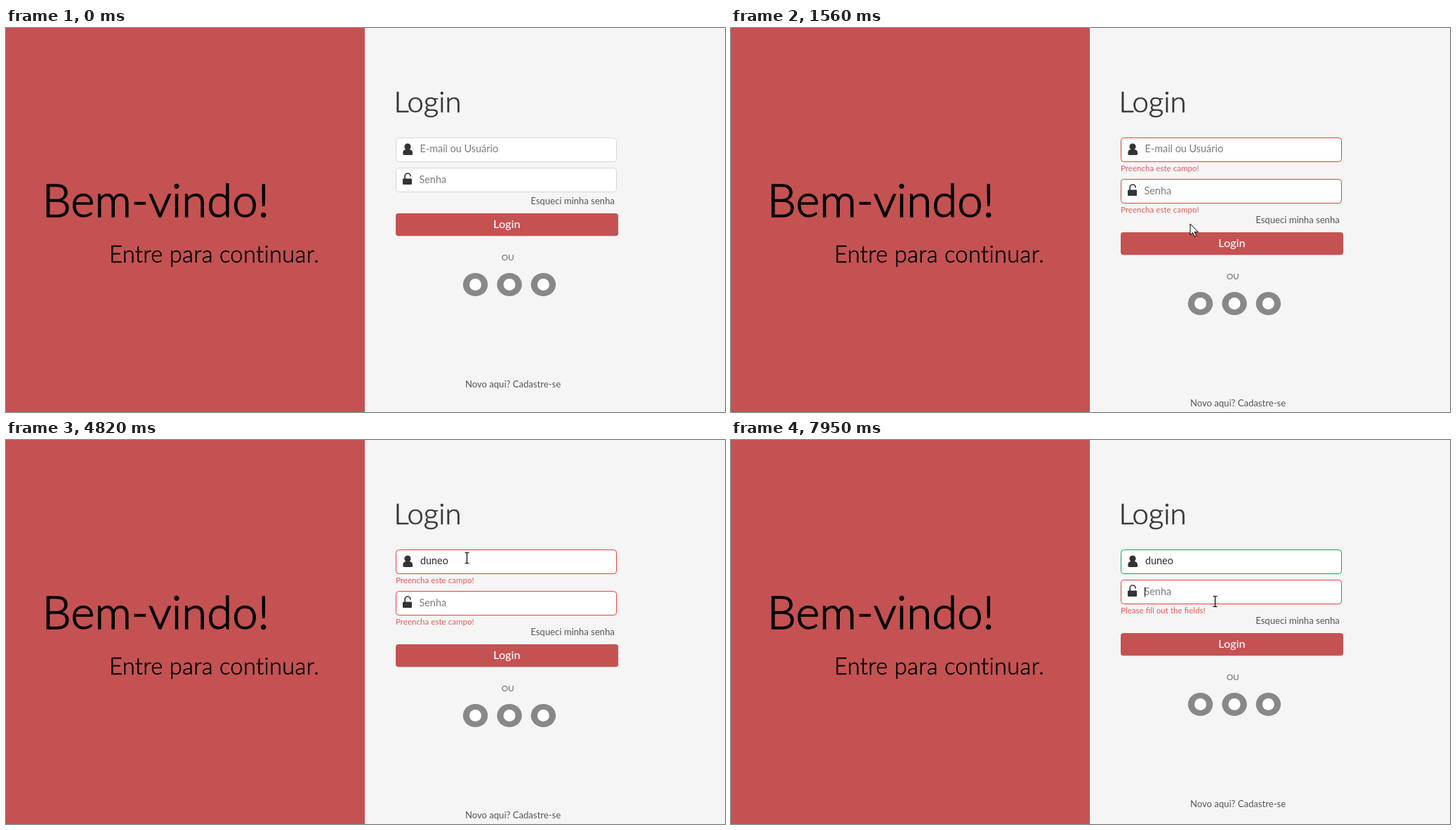
An HTML page for the animation above (8000 ms loop, 1024 by 547 pixels).

```html
<!DOCTYPE html>
<html lang="pt-BR">
<head>
<meta charset="utf-8">
<title>Login</title>
<style>
  html, body { margin: 0; width: 100%; height: 100%; overflow: hidden; background: #f5f5f5; }
  svg { display: block; width: 100vw; height: 100vh; font-family: Lato, "Open Sans", sans-serif; fill: #55575a; }
  .light { font-weight: 300; }
  .field { fill: #fff; stroke: #d6d6d6; }
  .hint { font-size: 14.4px; fill: #787f86; }
  .typed { font-size: 14.4px; fill: #2c2c2c; }
  .error { font-size: 11.6px; fill: #e35d5a; }
  .link { font-size: 13.1px; text-anchor: middle; }
  .icon { fill: #343436; }
  .cursor { fill: #fff; stroke: #000; stroke-linejoin: round; }
</style>
</head>
<body>
<svg viewBox="0 0 1024 547">
  <rect width="511" height="547" fill="#c55252"/>
  <g class="light" fill="#000" stroke="#000">
    <text x="51.5" y="269" font-size="65.3" stroke-width="1.4">Bem-vindo!</text>
    <text x="147" y="334" font-size="32.7" letter-spacing=".3" stroke-width=".5">Entre para continuar.</text>
  </g>
  <text class="light" x="552.5" y="120" font-size="41.8" fill="#363638" stroke="#363638" stroke-width=".7">Login</text>

  <rect id="userField" class="field" x="555.5" y="156.5" width="314" height="34" rx="4"/>
  <g class="icon">
    <circle cx="572" cy="169" r="4.6"/>
    <path d="M565.2 179q0-6 4.3-6h5q4.7 0 4.7 6q0 2-2 2h-10q-2 0-2-2z"/>
  </g>
  <text id="userHint" class="hint" x="589.5" y="177">E-mail ou Usuário</text>
  <text id="userText" class="typed" x="590" y="177"></text>
  <text id="userError" class="error" x="555" y="204">Preencha este campo!</text>

  <g id="password">
    <rect id="passField" class="field" x="555.5" y="199.5" width="314" height="34" rx="4"/>
    <rect class="icon" x="565" y="214.5" width="13" height="8.5" rx="1"/>
    <path d="M568.2 215v-4.2a3.9 3.8 0 0 1 7.8 0v.7" fill="none" stroke="#343436" stroke-width="1.7"/>
    <text class="hint" x="588.5" y="220.5">Senha</text>
    <text id="passError" class="error" x="555" y="247"></text>
  </g>

  <g id="tail">
    <text class="link" x="807" y="250.5">Esqueci minha senha</text>
    <rect id="button" x="555" y="264" width="317" height="32.3" rx="4"/>
    <text x="713.3" y="285" font-size="16.2" font-weight="500" text-anchor="middle" fill="#fff">Login</text>
    <text x="714.7" y="331" font-size="11.8" text-anchor="middle" fill="#686a6d">OU</text>
    <g id="social"></g>
    <text class="link" x="722" y="512">Novo aqui? Cadastre-se</text>
  </g>

  <rect id="caret" width="1" height="14" fill="#000"/>
  <circle id="click" r="11" fill="#ffe600" fill-opacity=".75"/>
  <g id="cursor" class="cursor">
    <path id="arrow" d="M0 0v16l3.7-3.5 2.4 5.6 2.5-1.1-2.4-5.3h5z"/>
    <path id="hand" d="M-1.5 1.5a1.5 1.5 0 0 1 3 0v6q2.5-1 3 1q2.4-.8 3 1q2.4-.5 2.5 1.5v4q0 3-2 5v1h-7v-1.5q-2-2-4-6q-2-2-2-3q1.2-1.7 3.5 .5zM1.5 7.5v3M4.5 8.5v3M7.5 9.5v2"/>
    <path id="beam" fill="none" stroke-width="1.2" d="M-2.5-7.5h2q1 0 1 1v13q0 1-1 1h-2M3.5-7.5h-2q-1 0-1 1M3.5 7.5h-2q-1 0-1-1"/>
  </g>
</svg>
<script>
const LOOP = 8000;
const USER = 'duneo';
const KEY_TIMES = [3620, 3820, 3890, 4090, 4290];
const CLICKS = [1500, 2760, 6340, 7890];
const CLICK_LENGTH = 60;
const RED = [229, 64, 58], GREEN = [40, 157, 75], GREY = '#d6d6d6';

// Pointer moves: first and last step time, step count, end points, optional bend
const MOVES = [
  { t0: 200, t1: 760, steps: 9, from: [894, 504], to: [657, 277] },
  { t0: 830, t1: 890, steps: 2, from: [657, 277], to: [655, 280] },
  { t0: 1020, t1: 1020, steps: 1, from: [655, 280], to: [654, 279] },
  { t0: 2030, t1: 2430, steps: 7, from: [654, 279], to: [653, 168.5], bend: [640, 222] },
  { t0: 3080, t1: 3230, steps: 3, from: [653, 168.5], to: [656, 168] },
  { t0: 5740, t1: 6010, steps: 5, from: [656, 168], to: [706, 298] },
  { t0: 7210, t1: 7280, steps: 2, from: [706, 298], to: [715, 289] },
  { t0: 7350, t1: 7620, steps: 5, from: [715, 289], to: [689, 230] }
];
const CARETS = [[2760, 3080], [3620, 4820], [5350, 5880], [7890, 8000]];

// Vertical offsets of the password field and everything below it
const LAYOUTS = [
  { start: 0, pass: 0, tail: 0 },
  { start: 1560, pass: 16, tail: 27, userError: true, passError: 'Preencha este campo!' },
  { start: 6400, pass: 0, tail: 11, passError: 'Please fill out the fields!' }
];

const $ = id => document.getElementById(id);
const show = (id, on) => $(id).setAttribute('visibility', on ? 'visible' : 'hidden');
const place = (id, x, y) => $(id).setAttribute('transform', `translate(${x} ${y})`);
const clamp = v => Math.max(0, Math.min(1, v));
const mix = (a, b, p) => a + (b - a) * p;
const latest = (list, key, t) => list.filter(item => item[key] <= t).pop();
const within = (v, low, high) => v >= low && v < high;

$('social').innerHTML = [668.5, 717, 765.3].map(x =>
  `<ellipse cx="${x}" cy="365.5" rx="17.7" ry="16.6" fill="#888"/><circle cx="${x}" cy="365.5" r="8.5" fill="#fff"/>`
).join('');

function pointerAt(t) {
  const move = latest(MOVES, 't0', t);
  if (!move) return null;
  const { t0, t1, steps, from, to } = move;
  const step = steps > 1 ? Math.floor((t - t0) / (t1 - t0) * (steps - 1)) : 0;
  const linear = clamp((step + 1) / steps);
  const p = linear * linear * (3 - 2 * linear);
  const bend = move.bend || from.map((v, i) => (v + to[i]) / 2);
  return from.map((v, i) => mix(mix(v, bend[i], p), mix(bend[i], to[i], p), p));
}

function drawForm(t, layout) {
  place('password', 0, layout.pass);
  place('tail', 0, layout.tail);
  show('userError', layout.userError);
  $('passError').textContent = layout.passError || '';
  const valid = clamp((t - 6400) / 140);
  const border = RED.map((v, i) => Math.round(mix(v, GREEN[i], valid)));
  const failed = Boolean(layout.passError);
  $('userField').style.stroke = failed ? `rgb(${border})` : GREY;
  $('passField').style.stroke = failed ? `rgb(${RED})` : GREY;

  const typed = USER.slice(0, KEY_TIMES.filter(k => k <= t).length);
  $('userText').textContent = typed;
  show('userHint', !typed);
  const inPassword = t >= 7890;
  const width = typed ? $('userText').getComputedTextLength() : 0;
  place('caret', inPassword ? 589 : Math.round(590 + width), inPassword ? 209.5 : 166.5);
  show('caret', CARETS.some(([on, off]) => within(t, on, off)));
}

function drawPointer(t, layout) {
  const point = pointerAt(t);
  const [x, y] = point || [0, 0];
  const inColumn = within(x, 555, 872);
  const onButton = inColumn && within(y, 264 + layout.tail, 296 + layout.tail);
  const onField = inColumn && (within(y, 157, 191) || within(y, 200 + layout.pass, 234 + layout.pass));
  const shape = onButton ? 'hand' : onField ? 'beam' : 'arrow';
  for (const id of ['arrow', 'hand', 'beam']) show(id, point && id === shape);
  place('cursor', x, y);
  place('click', x - 2, y - 1.5);
  show('click', CLICKS.some(c => within(t, c, c + CLICK_LENGTH)));
  $('button').style.fill = onButton ? '#b93e3e' : '#c55252';
}

function draw(t) {
  const layout = latest(LAYOUTS, 'start', t);
  drawForm(t, layout);
  drawPointer(t, layout);
}

const started = performance.now();
function tick() {
  draw((performance.now() - started) % LOOP);
  requestAnimationFrame(tick);
}
tick();
</script>
</body>
</html>
```
